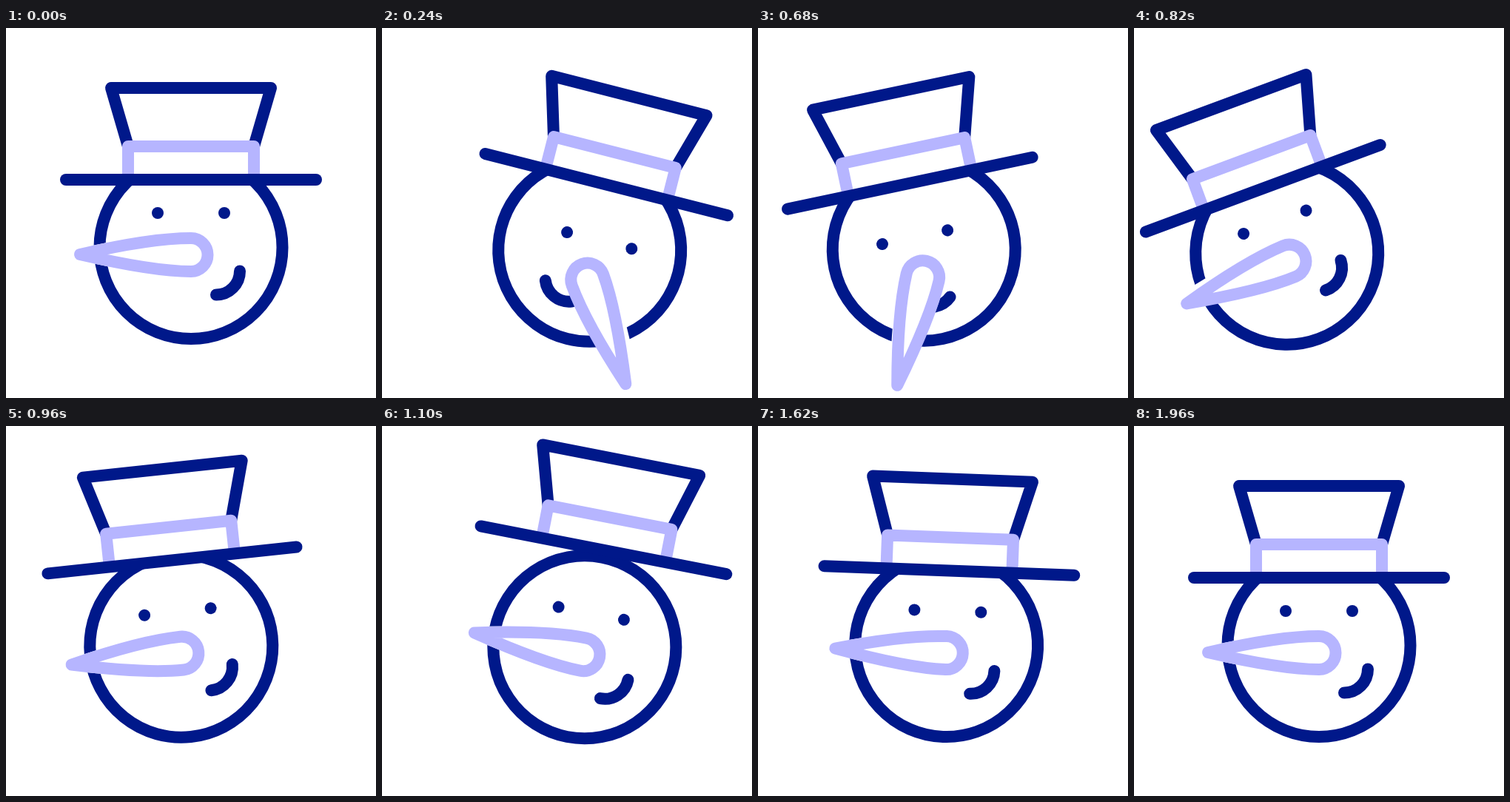
Animation of 500x500 px, one loop 2 s. Source, as an HTML page:

```html
<!DOCTYPE html>
<html lang="en">
<head>
<meta charset="utf-8">
<title>Snowman</title>
<style>
  html, body { margin: 0; width: 100%; height: 100%; overflow: hidden; background: #fff; }
  svg { display: block; width: 100%; height: 100%; }
  .line { fill: none; stroke: #00188a; stroke-width: 16; stroke-linecap: round; stroke-linejoin: round; }
  .light { stroke: #b6b5ff; }
  .blank { stroke: #fff; }
  .white { fill: #fff; }
  .dot { fill: #00188a; }
</style>
</head>
<body>
<svg viewBox="0 0 500 500">
  <defs>
    <path id="nose" d="M100 306C165 291 215 284 250 284A22.5 22.5 0 0 1 250 329C215 329 165 321 100 306Z"/>
  </defs>
  <g id="head">
    <circle class="line white" cx="250" cy="296.5" r="123.5"/>
    <path id="smile" class="line" d="M316 328.5A32 32 0 0 1 284 360.5"/>
    <g id="face">
      <use id="gap" href="#nose" class="line white blank"/>
      <circle class="dot" cx="205" cy="250" r="8"/>
      <circle class="dot" cx="295" cy="250" r="8"/>
      <use id="beak" href="#nose" class="line white light"/>
    </g>
    <g id="hat">
      <path class="white" d="M142 81H358L335 160V205H165V160Z"/>
      <path class="line" d="M165 160L142 81H358L335 160"/>
      <path class="line light" d="M165 203V160H335V203"/>
      <path class="line" d="M81 205H419"/>
    </g>
  </g>
</svg>
<script>
const LOOP = 2000, STEP = 20, MAX_TURN = 160;
const $ = id => document.getElementById(id);
const smooth = u => u * u * (3 - 2 * u);

// Cubic-bezier easing with flat ends and handles a, b
function ease(a, b) {
  return u => {
    let lo = 0, hi = 1;
    for (let i = 0; i < 24; i++) {
      const s = (lo + hi) / 2, r = 1 - s;
      if (3 * r * r * s * a + 3 * r * s * s * b + s * s * s < u) lo = s; else hi = s;
    }
    return smooth(lo);
  };
}
const swing = ease(0.2, 0.66);

// Each key: time, value, easing towards it
const tilt = [[0, 0], [400, 20.4, swing], [812, -20.4, swing], [1133, 12], [1410, -6], [1670, 3], [1960, 0]];
const look = [[0, 0], [345, 1], [465, 1], [847, 0]];
const hop = [[0, 0], [780, 0], [1100, 42], [1330, 0], [1590, 10], [1850, 0]];
const lead = [[0, 0], [240, -4], [540, -1.5], [820, 3], [900, 0]];

function at(keys, t) {
  const i = keys.findIndex(k => k[0] > t);
  if (i < 0) return keys[keys.length - 1][1];
  const [t0, v0] = keys[i - 1], [t1, v1, fn = smooth] = keys[i];
  return v0 + (v1 - v0) * fn((t - t0) / (t1 - t0));
}

const set = (id, value) => $(id).setAttribute("transform", value);
const spin = (angle, x, y) => `rotate(${angle} ${x} ${y})`;

function draw(t) {
  const p = at(look, t), turn = MAX_TURN * p;
  // The face follows a bent path as the nose swings round
  const s = turn / 180, c = 2 * s * (1 - s), e = s * s;
  set("head", spin(at(tilt, t), 250, 421));
  set("face", `translate(${-32 * c + 48 * e} ${56.5 * c + 13.5 * e})`);
  set("beak", spin(-turn, 248.5, 306.5));
  set("gap", spin(-turn + at(lead, t), 248.5, 306.5));
  set("smile", spin(73 * (1 - (1 - p) ** 2), 250, 296.5));
  set("hat", `translate(0 ${-at(hop, t)})`);
}

const start = performance.now();
function frame() {
  const t = (performance.now() - start) % LOOP;
  draw(Math.floor(t / STEP) * STEP);
  requestAnimationFrame(frame);
}
frame();
</script>
</body>
</html>
```
